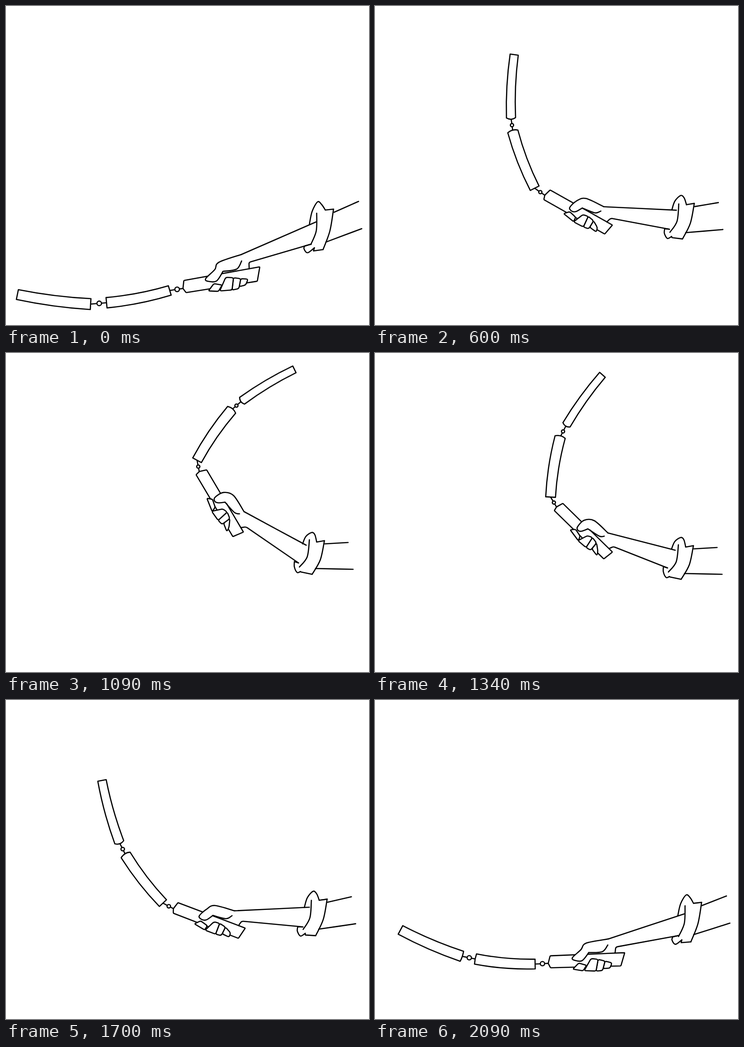
Recreate the animation shown at these times as an HTML page. Size 798x702 px, loop 2.21 s.

```html
<!DOCTYPE html>
<html lang="en">
<head>
<meta charset="utf-8">
<title>Three-section staff swing</title>
<style>
  html, body { margin: 0; width: 100%; height: 100%; overflow: hidden; background: #fff; }
  svg { display: block; width: 100vw; height: 100vh; }
  path { stroke: #000; stroke-width: 2.6; stroke-linecap: round; stroke-linejoin: round; }
</style>
</head>
<body>
<svg id="stage" viewBox="0 0 798 702"></svg>
<script>
const LOOP = 2210;
const TURN = 9;
const STARTS = [0, 130, 240, 350, 450, 600, 730, 860, 960, 1090,
  1210, 1340, 1470, 1600, 1700, 1830, 1960, 2090];

// Swing steps that own a key; the steps between are interpolated.
const KEY_STEPS = [0, 1, 3, 4, 5, 7, 9];

// Stick axes: outer stick tip and root, middle stick tip and root.
const STICKS = [
  [25,635, 186,656, 221,653, 360,626],
  [56,506, 191,564, 221,570, 352,581],
  [117,247, 199,380, 222,405, 337,492],
  [211,177, 249,313, 263,341, 345,447],
  [306,107, 299,246, 303,276, 351,401],
  [500,48, 421,158, 407,185, 386,317],
  [634,36, 519,105, 496,125, 420,236]
];
// Upper edge of the handle, left to right, and the peak of the cuff.
const ARM = [
  [391,604, 558,574, 685,431],
  [385,563, 549,556, 684,429],
  [372,485, 531,522, 679,425],
  [378,446, 526,502, 675,421],
  [385,405, 522,482, 672,417],
  [413,331, 522,438, 672,406]
];

// Hand and cuff with the arm lowest and highest.
const HAND_LOW = [
  517,547, 468,564, 459,580, 439,600, 445,606, 463,605, 477,584, 507,579, 518,561,
  534,564, 445,627, 457,611, 475,614, 467,628, 483,597, 500,598,
  497,625, 470,627, 516,600, 512,622, 532,601, 527,614];
const HAND_HIGH = [
  512,396, 482,369, 460,368, 445,383, 447,391, 455,392, 468,387, 493,403, 504,403,
  524,426, 429,389, 441,388, 451,403, 447,413, 467,402, 478,406,
  464,428, 446,413, 487,418, 474,434, 490,436, 488,446];
const CUFF_LOW = [
  667,480, 673,452, 685,431, 694,437, 702,449, 720,447, 712,495, 697,536,
  676,539, 678,532, 663,543, 655,534, 657,528, 683,456, 682,495, 670,525,
  682,475, 671,524, 775,430, 782,490];
const CUFF_HIGH = [
  652,431, 659,415, 672,406, 679,411, 683,427, 700,424, 691,466, 673,498,
  649,493, 647,492, 640,494, 634,482, 634,470, 667,422, 662,460, 645,482,
  660,434, 643,473, 752,428, 763,487];
const PEAK = 2;

const pairs = flat => flat.flatMap((v, i) => i % 2 ? [] : [[v, flat[i + 1]]]);
const mix = (a, b, t) => a.map((v, i) => v + (b[i] - v) * t);
const add = (a, b, t = 1) => a.map((v, i) => v + b[i] * t);
const sub = (a, b) => add(a, b, -1);
const at = p => p.map(v => v.toFixed(1)).join(" ");

// Lagrange interpolation over the nearest keys.
function sample(track, step) {
  const keys = KEY_STEPS.slice(0, track.length);
  const after = keys.findIndex(k => k > step);
  const next = after < 0 ? keys.length : after;
  const from = Math.max(0, next - 2);
  const near = keys.slice(from, next + 2);
  const weights = near.map(a => near.reduce(
    (w, b) => a === b ? w : w * (step - b) / (a - b), 1));
  return pairs(track[0].map((_, i) =>
    weights.reduce((sum, w, k) => sum + w * track[from + k][i], 0)));
}

// Coordinates relative to the axis a-b, and back.
function toLocal(p, [a, b]) {
  const [ux, uy] = sub(b, a), [dx, dy] = sub(p, a), n = ux * ux + uy * uy;
  return [(dx * ux + dy * uy) / n, (dy * ux - dx * uy) / n];
}
function toStage([u, v], [a, b]) {
  const [ux, uy] = sub(b, a);
  return [a[0] + u * ux - v * uy, a[1] + u * uy + v * ux];
}
const slope = ([a, b]) => Math.atan2(b[1] - a[1], b[0] - a[0]);

const lowArm = pairs(ARM[0]), highArm = pairs(ARM[5]);
const handLow = pairs(HAND_LOW).map(p => toLocal(p, lowArm));
const handHigh = pairs(HAND_HIGH).map(p => toLocal(p, highArm));
const fromPeak = shape => shape.map(p => sub(p, shape[PEAK]));
const cuffLow = fromPeak(pairs(CUFF_LOW));
const cuffHigh = fromPeak(pairs(CUFF_HIGH));

// Smooth curve through points.
function curve(p) {
  let d = `M${at(p[0])}`;
  for (let i = 0; i < p.length - 1; i++) {
    const a = p[i], b = p[i + 1], before = p[i - 1] || a, after = p[i + 2] || b;
    d += `C${at(add(a, sub(b, before), 1 / 6))} ` +
      `${at(add(b, sub(after, a), -1 / 6))} ${at(b)}`;
  }
  return d;
}

function toward(from, to, r) {
  const length = Math.hypot(...sub(to, from)) || 1;
  return mix(from, to, Math.min(.5, r / length));
}
const corner = (a, b, c, r) =>
  `L${at(toward(b, a, r))}Q${at(b)} ${at(toward(b, c, r))}`;

function rounded(p, r) {
  const n = p.length;
  const d = p.map((b, i) => corner(p[(i + n - 1) % n], b, p[(i + 1) % n], r)).join("");
  return "M" + d.slice(1) + "Z";
}

function ring([x, y], r) {
  return `M${at([x - r, y])}a${r} ${r} 0 1 0 ${2 * r} 0a${r} ${r} 0 1 0 ${-2 * r} 0Z`;
}

// Bowed stick; the cap points pull its ends out.
function stick(tip, root, tipWidth, rootWidth, bow, tipCap, rootCap) {
  const normal = (from, to) => {
    const [x, y] = sub(to, from), n = Math.hypot(x, y);
    return [y / n, -x / n];
  };
  const side = normal(root, tip);
  const bend = add(mix(tip, root, .5), side, 2 * bow);
  const tipSide = normal(bend, tip), rootSide = normal(root, bend);
  const width = (tipWidth + rootWidth) / 2;
  const edge = s => [
    add(tip, tipSide, s * tipWidth / 2),
    add(bend, side, s * width / 2),
    add(root, rootSide, s * rootWidth / 2)
  ].map(at);
  const [a, left, d] = edge(1), [b, right, c] = edge(-1);
  return `M${a}Q${at(tipCap)} ${b}Q${right} ${c}Q${at(rootCap)} ${d}Q${left} ${a}Z`;
}

// Ordered list of [path, is filled].
function drawPose(step) {
  const [tip, tipRoot, mid, midRoot] = sample(STICKS, step);
  const arm = sample(ARM, step);
  const [tl, tr, peak] = arm;
  const rise = (slope(arm) - slope(lowArm)) / (slope(highArm) - slope(lowArm));
  const turned = Math.max(0, Math.min(1, rise));

  const hand = handLow.map((p, i) => toStage(mix(p, handHigh[i], turned), arm));
  const cuff = cuffLow.map((p, i) => add(peak, mix(p, cuffHigh[i], turned)));
  const h = (...ids) => ids.map(i => hand[i]);
  const c = (...ids) => ids.map(i => cuff[i]);

  const edge = toStage([-.03, .1], arm);
  const bl = toStage([-.015 * turned, .16], arm);
  const br = toStage([.935 + .045 * turned, .178 - .02 * turned], arm);

  const upperRing = mix(tipRoot, mid, .54), lowerRing = mix(midRoot, edge, .56);
  const r = Math.max(3.5, 5 - 2 * turned);
  const bulge = .42 * Math.min(1, 2 * turned);
  const width = Math.max(16.4, 22 - .8 * step);
  const wrist = mix(tl, tr, .86 + .07 * turned);

  const links = [
    curve([tipRoot, upperRing, mid]),
    curve([midRoot, lowerRing, edge])
  ];
  const solids = [
    stick(tip, tipRoot, width, width + 2, 3, tip, mix(tipRoot, upperRing, bulge)),
    stick(mid, midRoot, 23, 21.5, 3.5, mix(mid, upperRing, bulge), midRoot),
    ring(upperRing, r),
    ring(lowerRing, r),
    rounded([tl, edge, bl, br, tr], 1.5),
    rounded([...h(18, 20, 21), mix(hand[19], hand[18], .2)], 4),
    rounded(h(15, 18, 19, 16), 4),
    rounded(h(14, 15, 16, 17), 4),
    rounded(h(10, 11, 12, 13), 3),
    curve(h(0, 1, 2, 3, 4, 5, 6))
  ];
  const lines = [
    curve(h(6, 7, 8)),
    curve([hand[0], cuff[16]]),
    `M${at(wrist)}${corner(wrist, hand[9], cuff[17], 4)}L${at(cuff[17])}`,
    curve(c(0, 1, 2, 3, 4)),
    curve(c(4, 5)),
    curve(c(5, 6, 7)),
    `M${c(7, 8, 9).map(at).join("L")}`,
    curve(c(9, 10, 11, 12)),
    curve(c(12, 17)),
    curve(c(13, 14, 15)),
    curve([add(cuff[5], [1, 7]), cuff[18]]),
    curve([mix(cuff[6], cuff[7], .6), cuff[19]])
  ];
  return [
    ...links.map(d => [d, false]),
    ...solids.map(d => [d, true]),
    ...lines.map(d => [d, false])
  ];
}

const stage = document.getElementById("stage");
let shown = -1;

function render(time) {
  const t = time % LOOP;
  const index = STARTS.filter(start => start <= t).length - 1;
  const step = index <= TURN ? index : 2 * TURN - index;
  if (step === shown) return;
  shown = step;
  stage.innerHTML = drawPose(step)
    .map(([d, solid]) => `<path d="${d}" fill="${solid ? "#fff" : "none"}"/>`)
    .join("");
}

const began = performance.now();
function tick() {
  render(Math.max(0, performance.now() - began));
  requestAnimationFrame(tick);
}
tick();
</script>
</body>
</html>
```
